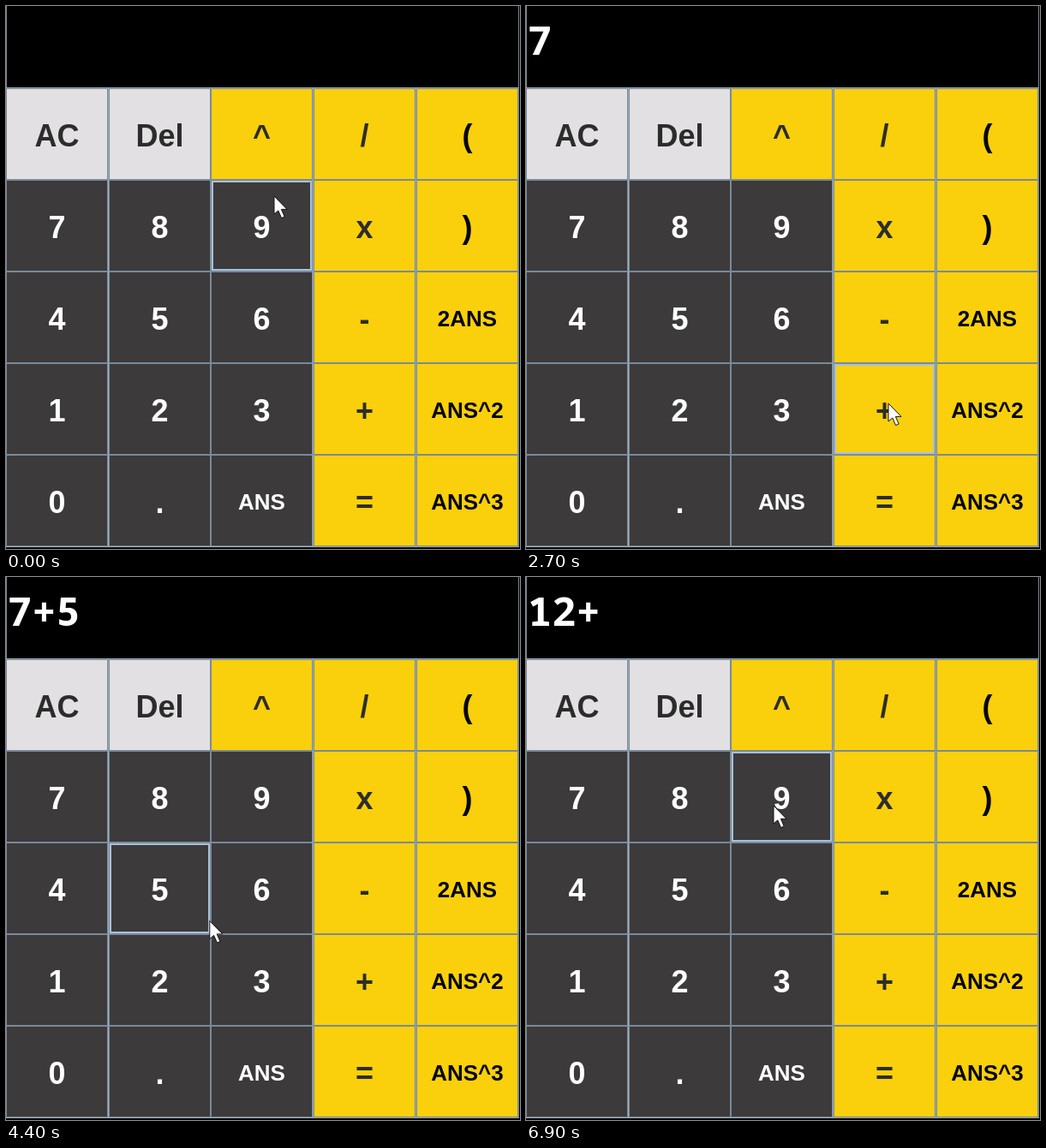
Recreate the animation shown at these times as an HTML page. Size 600 px wide and 634 px high, loop 7 s.

```html
<!DOCTYPE html>
<html lang="en">
<head>
<meta charset="utf-8">
<title>Calculator</title>
<style>
html, body { margin: 0; width: 100%; height: 100%; overflow: hidden; background: #000; }
svg { display: block; width: 600px; height: 634px; }
.key { font: bold 36px "Liberation Sans", Arial, sans-serif; text-anchor: middle; }
.small { font-size: 26px; }
.screen { font: bold 47px "Noto Sans Mono", "DejaVu Sans Mono", monospace; fill: #fff; }
</style>
</head>
<body>
<svg id="stage" viewBox="0 0 600 634"></svg>
<script>
const LOOP = 7000, STEP = 100;
const COL = 119.7, ROW = 107, TOP = 96, W = 119;
const LINE = '#7a8a99', GLOW = '#a9c0d8', PRESSED = '#b8cfe5';
const YELLOW = '#f9d00b', DARK = '#3c3a3b', LIGHT = '#e2e0e2';
const LABELS = [
  'AC Del ^ / (',
  '7 8 9 x )',
  '4 5 6 - 2ANS',
  '1 2 3 + ANS^2',
  '0 . ANS = ANS^3'
].map(row => row.split(' '));

// pointer stops: time, x, y
const PATH = [
  [0, 313, 222], [500, 306, 227], [1200, 148, 252], [1500, 68, 266],
  [1900, 66, 267], [2600, 421, 463], [2700, 423, 464], [3200, 422, 463],
  [3700, 220, 350], [3900, 189, 362], [4200, 191, 364], [4900, 427, 553],
  [5300, 427, 553], [5900, 378, 467], [6100, 377, 466], [6300, 377, 465],
  [6900, 289, 267], [7000, 288, 262]
];

// key presses: down, up, label, text shown after release
const PRESSES = [
  [1600, 1800, '7', '7'],
  [2900, 3000, '+', '7+'],
  [3900, 4000, '5', '7+5'],
  [5000, 5200, '=', '12'],
  [6000, 6200, '+', '12+']
];

const stage = document.getElementById('stage');

function add(tag, attrs, text) {
  const el = document.createElementNS('http://www.w3.org/2000/svg', tag);
  for (const name in attrs) el.setAttribute(name, attrs[name]);
  if (text) el.textContent = text;
  return stage.appendChild(el);
}

function baseFill(row, col) {
  if (row === 0 && col < 2) return LIGHT;
  return col < 3 && row > 0 ? DARK : YELLOW;
}

function inkFor(fill, col) {
  if (fill === DARK) return '#fff';
  return col === 4 ? '#050505' : '#2d2c2d';
}

function makeKey(label, row, col) {
  const x = Math.round(col * COL), y = TOP + row * ROW;
  const fill = baseFill(row, col);
  const face = add('rect', {
    x: x + .5, y: y + .5, width: W - 1, height: ROW - 1, fill, stroke: LINE
  });
  const glow = add('rect', {
    x: x + 2, y: y + 2, width: W - 4, height: ROW - 4,
    fill: 'none', stroke: GLOW, 'stroke-width': 2
  });
  const small = label.includes('ANS');
  add('text', {
    x: x + W / 2, y: y + (small ? 64 : 68),
    class: small ? 'key small' : 'key', fill: inkFor(fill, col)
  }, label);
  return { label, row, col, fill, face, glow };
}

add('rect', { width: 600, height: 634, fill: '#000' });
add('rect', { x: 0, y: 95, width: 599, height: 537, fill: '#9dacb9' });
add('path', { d: 'M.5 0V95M598.5 0V632', stroke: LINE });
const keys = LABELS.flatMap((row, r) => row.map((label, c) => makeKey(label, r, c)));
const screen = add('text', { x: 2, y: 57, class: 'screen' });
const pointer = add('path', {
  d: 'M0 0V21L4.8 16.9L8.6 25.6L12.2 24L8.4 15.4H15Z',
  fill: '#fff', stroke: '#111', 'stroke-width': 1, 'stroke-linejoin': 'round'
});

function pointerAt(t) {
  const i = PATH.findIndex((p, n) => n && t < p[0]);
  const [t0, x0, y0] = PATH[i - 1], [t1, x1, y1] = PATH[i];
  const u = (t - t0) / (t1 - t0), e = u * u * (3 - 2 * u);
  return [x0 + (x1 - x0) * e, y0 + (y1 - y0) * e];
}

function draw(now) {
  const t = Math.floor((now % LOOP) / STEP) * STEP;
  const [x, y] = pointerAt(t);
  const col = Math.floor(x / COL), row = Math.floor((y - TOP) / ROW);
  const press = PRESSES.find(p => t >= p[0] && t < p[1]);
  const done = PRESSES.filter(p => t >= p[1]).pop();
  for (const k of keys) {
    const down = Boolean(press) && press[2] === k.label;
    const over = k.row === row && k.col === col;
    k.face.setAttribute('fill', down ? PRESSED : k.fill);
    k.glow.setAttribute('visibility', over && !down ? 'visible' : 'hidden');
  }
  screen.textContent = done ? done[3] : '';
  pointer.setAttribute('transform', `translate(${x.toFixed(1)} ${y.toFixed(1)})`);
}

const start = performance.now();
function tick() {
  draw(performance.now() - start);
  requestAnimationFrame(tick);
}
tick();
</script>
</body>
</html>
```
